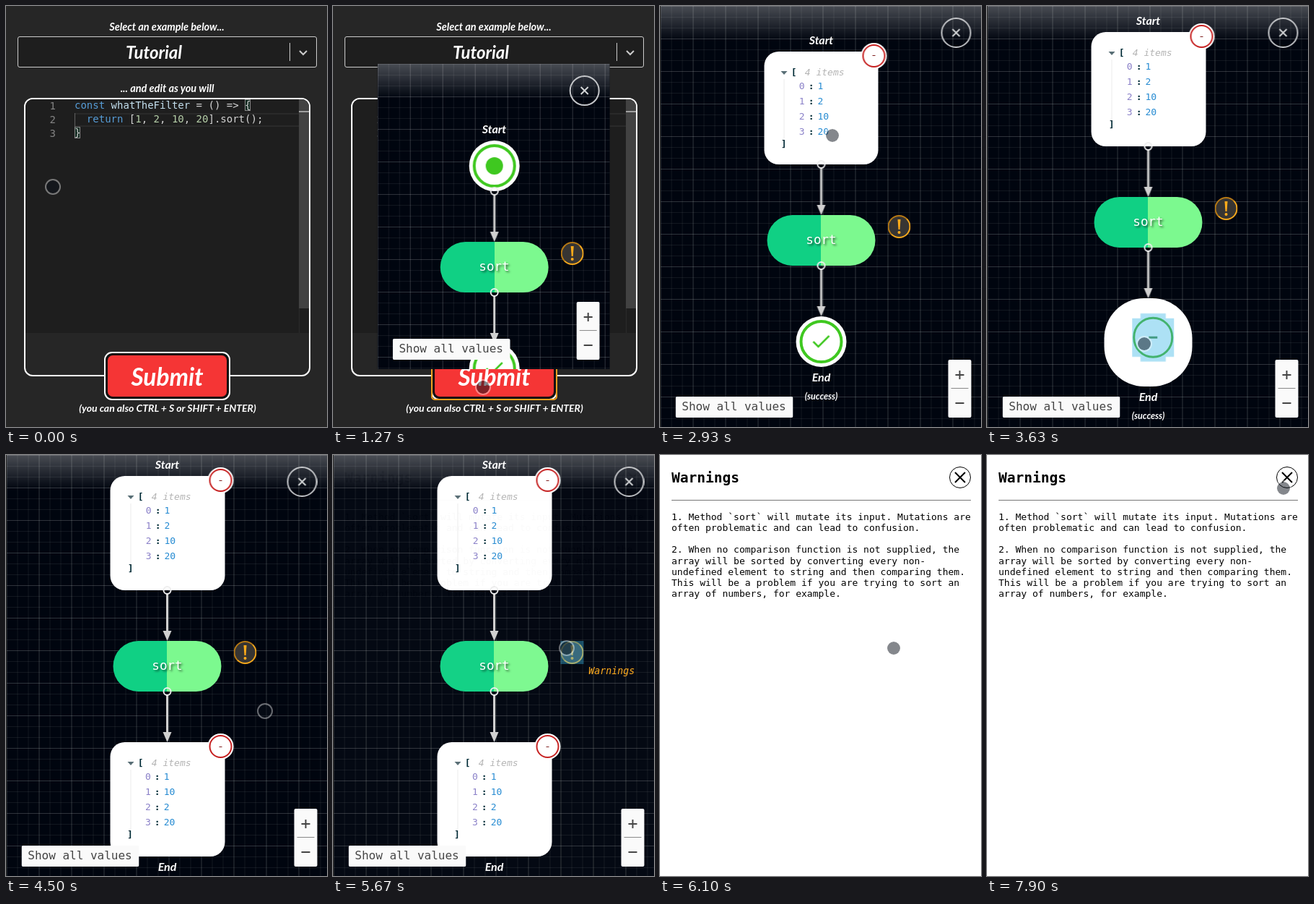
An HTML page for the animation above (8 s loop, 445 px wide and 582 px high).

```html
<!DOCTYPE html>
<html lang="en">
<head>
<meta charset="utf-8">
<title>Array method visualiser</title>
<style>
  * { box-sizing: border-box; }
  html, body { margin: 0; width: 100%; height: 100%; overflow: hidden; }
  body { position: relative; background: #262626; color: #fff; font: 13px/15px "DejaVu Sans Mono", monospace; }
  div, pre, svg, i { position: absolute; margin: 0; }
  pre { font: inherit; }
  svg { fill: none; overflow: visible; }
  .hand { font: italic 700 14.5px/20px Lato, sans-serif; text-align: center; white-space: nowrap; }

  /* page */
  .select { left: 16px; top: 42px; width: 415px; height: 43px; border: 1px solid #ccc; border-radius: 3px; background: #1e1e1e; }
  .editor { left: 25px; top: 127px; width: 397px; height: 385px; border: 2px solid #fff; border-radius: 12px; overflow: hidden; }
  .area { left: 0; top: 0; width: 393px; height: 323px; background: #1e1e1e; }
  .line { left: 68px; top: 19px; width: 311px; height: 19px; border: solid #2a2a2a; border-width: 2px 0; }
  .bar { left: 379px; top: 0; width: 14px; height: 289px; background: #424242; }
  .code { font-size: 14px; line-height: 19px; color: #d4d4d4; }
  .code b { font-weight: 400; color: #569cd6; }
  .code u { text-decoration: none; color: #b5cea8; }
  .code s { text-decoration: none; color: #c3dfee; }
  .code em { font-style: normal; outline: 1px solid #888; outline-offset: -1px; background: #10291f; }
  .submit { left: 136px; top: 478px; width: 175px; height: 67px; border: 2px solid #fff; border-radius: 11px; background: #111; }
  .submit .hand { inset: 3px; border-radius: 7px; background: #f53535; font-size: 33.5px; line-height: 58px; }
  .ring { inset: -2px; border: 2px solid #f0a020; border-radius: 5px; animation: focus 8s step-end infinite; }
  @keyframes focus { 0% { opacity: 0 } 14.125%, 100% { opacity: 1 } }

  /* modal */
  .modal { left: 50%; top: 50%; transform: translate(-50%, -50%); overflow: hidden; background: #00050f; animation: open 8s infinite; }
  @keyframes open {
    0%, 14% { width: 0; height: 0 }
    18.375%, 100% { width: 100%; height: 100% }
  }
  .grid { inset: 0;
    --h: #ffffff1f; --l: #ffffff12;
    background:
      linear-gradient(#ffffff48, #fff0 48px),
      linear-gradient(var(--h) 1px, #0000 1px) 0 0 / 45px 45px,
      linear-gradient(90deg, var(--h) 1px, #0000 1px) 0 0 / 45px 45px,
      linear-gradient(var(--l) 1px, #0000 1px) 0 0 / 15px 15px,
      linear-gradient(90deg, var(--l) 1px, #0000 1px) 0 0 / 15px 15px; }
  .close { right: 14px; top: 16px; width: 42px; height: 42px; border: 2px solid #c4c6c9; border-radius: 50%; }
  .panel { background: #fafafa; color: #444; border-radius: 2px; }
  .all { left: 21px; bottom: 13px; width: 163px; height: 29px; font-size: 16px; line-height: 28px; text-align: center; }
  .zoom { right: 14px; bottom: 13px; width: 32px; height: 80px; }

  /* graph */
  .graph { left: 50%; top: 29px; width: 160px; height: 504px; margin-left: -79px; display: flex; }
  .flow { position: relative; flex: none; width: 160px; margin: auto 0; display: flex; flex-direction: column; align-items: center; gap: 70px; }
  .node, .sort { position: relative; flex: none; }
  .node { width: 70px; height: 70px; border-radius: 50%; background: #fff; animation: grow 8s var(--d) infinite both, corner 8s var(--d) infinite both; }
  .end { --d: .9s; }
  .start { --d: 0s; }
  @keyframes grow {
    0%, 33.375% { width: 70px; height: 70px;
      animation-timing-function: linear(0, .197 4.3%, .58 8.6%, .935 12.9%, 1.143 17.1%, 1.2 21.4%, 1.162 25.7%, 1.083 30%, .995 35.7%, .96 42.9%, .984 51.4%, 1.008 64.3%, 1); }
    42.125%, 100% { width: 159px; height: 158px }
  }
  @keyframes corner {
    0%, 33.375% { border-radius: 50%; animation-timing-function: ease-in-out }
    36.5%, 100% { border-radius: 12.6% }
  }
  .label { left: 50%; transform: translateX(-50%); font-size: 16px; }
  .sort { width: 150px; height: 70px; border-radius: 35px; background: linear-gradient(90deg, #10d084 50%, #7cf98f 50%); font-size: 17.6px; line-height: 68px; text-align: center; text-shadow: 2px 2px 3px #0009; }
  .edge { left: 50%; top: 100%; width: 14px; height: 70px; margin-left: -7px; }

  .badge { left: 50%; top: 50%; width: 60px; height: 60px; transform: translate(-50%, -50%); border: 4px solid #3c1; border-radius: 50%; background: #fff; animation: badge 8s var(--d) infinite both; }
  @keyframes badge {
    0%, 33.375% { left: 50%; top: 50%; width: 60px; height: 60px; border: 4px solid #3fc820; box-shadow: 0 0 0 3px #fff; animation-timing-function: ease-in-out }
    36.5%, 100% { left: calc(100% - 6px); top: 6px; width: 32px; height: 32px; border: 2px solid #c62020; box-shadow: 0 0 0 2px #fff }
  }
  .mark { inset: 0; margin: auto; width: 24px; height: 24px; animation: mark 8s var(--d) step-end infinite both; }
  .dot { border-radius: 50%; background: #3fc820; }
  @keyframes mark { 0% { opacity: 1 } 33.6%, 100% { opacity: 0 } }
  .minus { inset: 0; margin: auto; animation: minus 8s var(--d) infinite both; }
  @keyframes minus {
    0%, 33.59% { width: 15px; height: 5px; opacity: 0; background: #3fb050 }
    33.6% { width: 15px; height: 5px; opacity: 1; background: #3fb050 }
    36.5%, 100% { width: 4px; height: 1px; opacity: 1; background: #802020 }
  }
  .tap { inset: -5px; background: #33b5e566; opacity: 0; animation: tap 8s var(--d) step-end infinite both; }
  .badge .tap { inset: -8px -4px; clip-path: polygon(0 10%, 20% 10%, 20% 0, 80% 0, 80% 10%, 100% 10%, 100% 90%, 80% 90%, 80% 100%, 20% 100%, 20% 90%, 0 90%); }
  @keyframes tap { 0% { opacity: 0 } 33.375% { opacity: 1 } 35%, 100% { opacity: 0 } }

  .json { left: 50%; top: 0; width: 159px; height: 158px; margin-left: -79.5px; color: #002b36; animation: json 8s var(--d) infinite both; }
  @keyframes json { 0%, 35% { opacity: 0 } 36.8%, 100% { opacity: 1 } }
  .json pre { left: 49px; top: 37px; line-height: 21px; color: #268bd2; }
  .json s { text-decoration: none; color: #8a80c8; }
  .json b { color: #002b36; margin: 0 5px; }

  .warn { left: 167px; top: 0; width: 32px; height: 32px; border: 2px solid; border-color: #b87a14 #f5a81c #f5a81c #b87a14; border-radius: 50%; background: #373533; color: #ffab1a; }
  .warn .tap { --d: 2.93s; inset: -2px; }
  .note { left: 37px; top: 6px; font-size: 13.3px; font-style: italic; text-shadow: none; animation: note 8s step-end infinite; }
  @keyframes note { 0% { opacity: 0 } 65.875%, 100% { opacity: 1 } }

  /* warnings sheet */
  .sheet { inset: 0; background: #fff; color: #000; animation: sheet 8s infinite; }
  @keyframes sheet {
    0%, 70.375% { opacity: 0; animation-timing-function: ease-in-out }
    75.875%, 100% { opacity: 1 }
  }
  .sheet .title { left: 16px; top: 20px; font: 700 19.5px/23px "DejaVu Sans Mono", monospace; }
  .sheet .rule { left: 16px; top: 62px; width: 415px; height: 1px; background: #777; }
  .sheet pre { left: 16px; top: 78px; line-height: 15.15px; }

  .cursor { width: 22px; height: 22px; margin: -11px; border: 2px solid #ffffff66; border-radius: 50%; background: #0b101a80; background-clip: padding-box; animation: cx 8s infinite, cy 8s infinite; }
  @keyframes cx {
    0%, .375% { left: 65px }
    7.125%, 22.125% { left: 208px; animation-timing-function: ease-out }
    26.25% { left: 265px; animation-timing-function: ease-in-out }
    30.875%, 34.5% { left: 243px; animation-timing-function: ease-in-out }
    42.5%, 47.5% { left: 218px; animation-timing-function: ease-in-out }
    54.6%, 55% { left: 362px; animation-timing-function: ease-in-out }
    61.5% { left: 319px; animation-timing-function: ease-in-out }
    65% { left: 324px; animation-timing-function: step-end }
    92.125% { left: 353px; animation-timing-function: step-end }
    94.125% { left: 385px; animation-timing-function: step-end }
    96.25% { left: 402px; animation-timing-function: step-end }
    98.75%, 100% { left: 411px }
  }
  @keyframes cy {
    0%, .375% { top: 250px }
    7.125%, 22.125% { top: 527px; animation-timing-function: ease-out }
    30.875%, 34.5% { top: 129px; animation-timing-function: ease-in-out }
    42.5%, 47.5% { top: 467px; animation-timing-function: ease-in-out }
    54.6%, 55% { top: 363px; animation-timing-function: ease-in-out }
    61.5% { top: 252px; animation-timing-function: ease-in-out }
    65% { top: 267px; animation-timing-function: step-end }
    92.125% { top: 172px; animation-timing-function: step-end }
    94.125% { top: 92px; animation-timing-function: step-end }
    96.25% { top: 64px; animation-timing-function: step-end }
    98.75%, 100% { top: 46px }
  }
</style>
</head>
<body>
  <div class="hand" style="left:0;width:446px;top:19px">Select an example below...</div>
  <div class="select">
    <div class="hand" style="left:0;width:376px;top:7px;font-size:24px;line-height:28px">Tutorial</div>
    <i style="left:376px;top:8px;width:1px;height:25px;background:#ccc"></i>
    <svg style="left:389px;top:18px" width="12" height="8" stroke="#ccc" stroke-width="2"><path d="M1 1l5 5 5-5"/></svg>
  </div>
  <div class="hand" style="left:0;width:447px;top:104px">... and edit as you will</div>
  <div class="editor">
    <div class="area"></div>
    <div class="line"></div>
    <i style="left:68px;top:19px;width:1px;height:19px;background:#606060"></i>
    <pre class="code" style="left:33.5px;top:0;color:#858585">1
2
3</pre>
    <pre class="code" style="left:68px;top:-1px"><b>const</b> <s>whatTheFilter</s> = () =&gt; <em>{</em>
  <b>return</b> [<u>1</u>, <u>2</u>, <u>10</u>, <u>20</u>].sort();
<em>}</em></pre>
    <div class="bar"></div>
    <i style="left:379px;top:16px;width:14px;height:2px;background:#a0a0a0"></i>
    <i style="left:379px;top:289px;width:1px;height:34px;background:#2b2b2b"></i>
  </div>
  <div class="submit"><div class="hand">Submit</div><i class="ring"></i></div>
  <div class="hand" style="left:0;width:448px;top:546px;font-size:14px">(you can also CTRL + S or SHIFT + ENTER)</div>

  <div class="modal">
    <div class="grid"></div>
    <div class="graph"><div class="flow">
      <div class="node start">
        <div class="hand label" style="top:-26px">Start</div>
        <div class="json">
          <svg style="left:24px;top:27px" width="9" height="5" fill="#586e75"><path d="M0 0h9l-4.500 5z" fill="#586e75"/></svg>
          <div style="left:38px;top:21px"><b style="margin:0">[</b></div>
          <div style="left:57px;top:21px;font-style:italic;color:#b4b4b4;white-space:nowrap">4 items</div>
          <i style="left:28px;top:38px;width:1px;height:82px;background:#ebebeb"></i>
          <pre><s>0</s><b>:</b>1
<s>1</s><b>:</b>2
<s>2</s><b>:</b>10
<s>3</s><b>:</b>20</pre>
          <div style="left:24px;top:120px"><b style="margin:0">]</b></div>
        </div>
        <div class="badge"><i class="mark dot"></i><i class="minus"></i><i class="tap"></i></div>
        <svg class="edge" stroke="#d0d0d0"><path d="M7 5v54" stroke-width="3"/><path d="M1 56h12L7 70z" fill="#d0d0d0" stroke="none"/><circle cx="7" cy="0" r="5" stroke="#eee" stroke-width="2"/></svg>
      </div>
      <div class="sort">sort
        <svg class="edge" stroke="#d0d0d0"><path d="M7 5v54" stroke-width="3"/><path d="M1 56h12L7 70z" fill="#d0d0d0" stroke="none"/><circle cx="7" cy="0" r="5" stroke="#eee" stroke-width="2"/></svg>
        <div class="warn">
          <svg style="left:10px;top:4px" width="8" height="21" fill="#ffab1a"><path d="M2 0h4L5 14H3z" fill="#ffab1a"/><circle cx="4" cy="18" r="2" fill="#ffab1a"/></svg>
          <i class="tap"></i>
          <div class="note">Warnings</div>
        </div>
      </div>
      <div class="node end">
        <div class="json">
          <svg style="left:24px;top:27px" width="9" height="5"><path d="M0 0h9l-4.500 5z" fill="#586e75"/></svg>
          <div style="left:38px;top:21px"><b style="margin:0">[</b></div>
          <div style="left:57px;top:21px;font-style:italic;color:#b4b4b4;white-space:nowrap">4 items</div>
          <i style="left:28px;top:38px;width:1px;height:82px;background:#ebebeb"></i>
          <pre><s>0</s><b>:</b>1
<s>1</s><b>:</b>10
<s>2</s><b>:</b>2
<s>3</s><b>:</b>20</pre>
          <div style="left:24px;top:120px"><b style="margin:0">]</b></div>
        </div>
        <div class="badge">
          <svg class="mark" viewBox="0 0 24 24" stroke="#3fc820" stroke-width="2.500"><path d="M1 12l7 7L23 4"/></svg>
          <i class="minus"></i><i class="tap"></i>
        </div>
        <div class="hand label" style="top:calc(100% + 4px)">End</div>
        <div class="hand label" style="top:calc(100% + 31px);font-size:12.500px">(success)</div>
      </div>
    </div></div>
    <div class="close"><svg style="left:14px;top:14px" width="10" height="10" stroke="#d0d2d4" stroke-width="2"><path d="M0 0l10 10M10 0L0 10"/></svg></div>
    <div class="panel all">Show all values</div>
    <div class="panel zoom"><svg width="32" height="80" stroke="#444" stroke-width="2"><path d="M10 21h12M16 15v12M10 60h12"/><path d="M4 39.500h24" stroke="#888" stroke-width="1"/></svg></div>
  </div>

  <div class="sheet">
    <div class="title">Warnings</div>
    <svg style="left:401px;top:16px" width="30" height="30" stroke="#000"><circle cx="15" cy="15" r="14.500"/><path d="M8 8l14 14M22 8L8 22" stroke-width="2"/></svg>
    <div class="rule"></div>
    <pre>1. Method `sort` will mutate its input. Mutations are
often problematic and can lead to confusion.

2. When no comparison function is not supplied, the
array will be sorted by converting every non-
undefined element to string and then comparing them.
This will be a problem if you are trying to sort an
array of numbers, for example.</pre>
  </div>
  <div class="cursor"></div>
</body>
</html>
```
